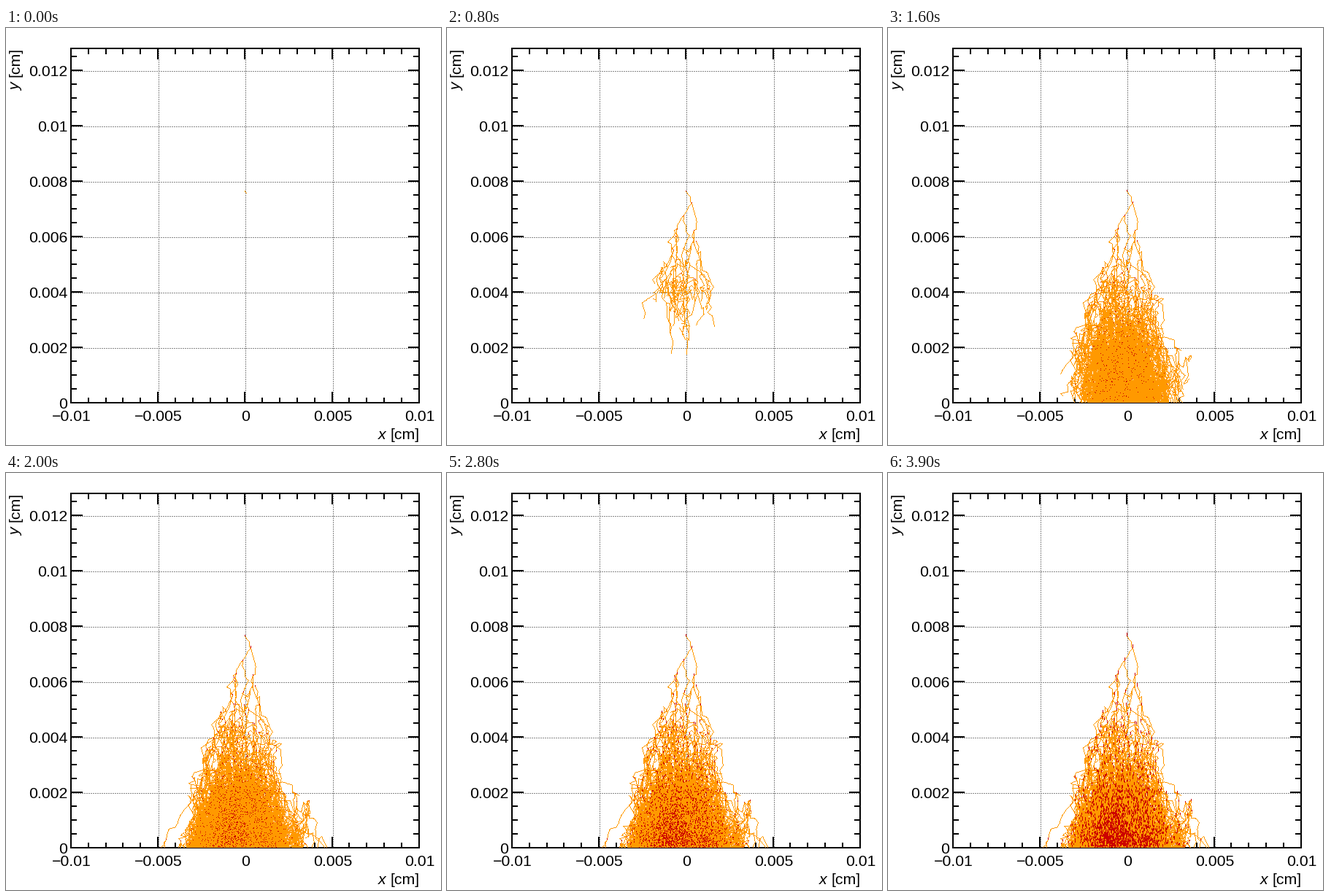
A matplotlib script that plays this animation: 596x572 px, repeating every 4000 ms.

```python
import random

import matplotlib.pyplot as plt
import numpy as np
from matplotlib.animation import FuncAnimation
from matplotlib.collections import LineCollection

W, H, DPI = 596, 572, 64
PX = 72 / DPI                      # points per pixel
LEFT, RIGHT, TOP, BOTTOM = 89, 566, 28, 514
FLOOR = BOTTOM - 1
FRAMES, INTERVAL = 40, 100
ORANGE, RED = (255, 153, 0, 255), (204, 0, 0, 255)
STEP = 0.25                        # frames between two collisions
ION_SPEED = 0.12                   # pixels per frame, upwards
ION_REACH = 6

rng = random.Random(12)
# Time at which each pixel is first touched.
electron_time = np.full((H, W), np.inf)
ion_time = np.full((H, W), np.inf)


def add_segment(t, p, q):
    """Trace one step, cut at the bottom axis; tell whether it got there."""
    (x0, y0), (x1, y1) = p, q
    hit = y1 >= FLOOR
    if hit:
        x1 = x0 + (x1 - x0) * (FLOOR - y0) / max(y1 - y0, 1e-6)
        y1 = FLOOR
    n = int(max(abs(x1 - x0), abs(y1 - y0))) + 2
    cols = np.rint(np.linspace(x0, x1, n)).astype(int)
    rows = np.rint(np.linspace(y0, y1, n)).astype(int)
    electron_time[rows, cols] = np.minimum(electron_time[rows, cols], t)
    return hit


def add_ion(t, p):
    """Let an ion creep upwards from p, one pixel at a time."""
    col, row, phase = round(p[0]), round(p[1]), rng.random()
    for k in range(ION_REACH):
        when = t + (k + 1 - phase) / ION_SPEED
        ion_time[row - k, col] = min(ion_time[row - k, col], when)


def free_path():
    return rng.randint(3, 10)


def avalanche(t, p):
    """Drift and diffuse one electron and all its descendants."""
    stack = [(t, p)]
    while stack:
        t, p = stack.pop()
        gap = free_path()
        while t < FRAMES:
            t += STEP
            q = p[0] + rng.gauss(0, 3.9), p[1] + rng.gauss(4.5, 5.2)
            if add_segment(t, p, q):
                break
            p = q
            gap -= 1
            if gap == 0:
                add_ion(t, p)
                stack.append((t, p))
                gap = free_path()


def guide(t0, t1, *keys, gap=6, seed_end=True):
    """Wander along key points, releasing an electron every gap steps."""
    keys = np.array(keys, float)
    dist = np.r_[0, np.cumsum(np.hypot(*np.diff(keys, axis=0).T))]
    n = max(4, round(dist[-1] / 7))
    path = []
    for s in np.linspace(0, dist[-1], n + 1):
        jitter = 1.6 if 0 < s < dist[-1] else 0
        path.append(tuple(np.interp(s, dist, k) + rng.gauss(0, jitter)
                          for k in keys.T))
    add_ion(t0, path[0])
    for i in range(1, n + 1):
        t = t0 + (t1 - t0) * i / n
        if add_segment(t, path[i - 1], path[i]):
            return
        if i % gap == 0 and t > 2.5:
            add_ion(t, path[i])
            avalanche(t, path[i])
    if seed_end:
        avalanche(t1, path[-1])


def build():
    # First generations near the top.
    guide(0, 1, (327, 223), (335, 239), seed_end=False)
    guide(1, 3.9, (335, 239), (323, 258), (312, 280), (315, 308))
    guide(1, 3.8, (335, 239), (340, 248), (342, 276), (333, 300))
    guide(1.7, 3.7, (324, 257), (328, 276), (325, 300))
    guide(2.9, 4.8, (312, 280), (301, 292), (313, 325))
    # Stragglers along both flanks.
    guide(3.6, 8.3, (341, 292), (347, 335), (363, 350), (358, 390),
          (366, 409), gap=12, seed_end=False)
    guide(8.3, 17, (366, 409), (383, 453), (399, 490), (396, 514), gap=12)
    guide(4.8, 19, (313, 325), (289, 356), (273, 372), (272, 420),
          (231, 482), (211, 514), gap=10)


def x_px(v):
    return 327.31 + v * 119.25 / 0.005


def y_px(v):
    return BOTTOM - v * 38000


def text(x, y, s, **kw):
    ax.text(x, y, s, family="Liberation Sans", size=21.2 * PX,
            color="black", **{"va": "baseline", **kw})


def lines(segs, width, color, **kw):
    ax.add_collection(LineCollection(
        segs, linewidths=width * PX, colors=color, antialiaseds=False,
        **{"capstyle": "butt", **kw}), autolim=False)


def draw_grid():
    dots = []
    for i in (-1, 0, 1):
        x = round(x_px(i * 0.005)) + 0.5
        dots.append([(x, TOP), (x, BOTTOM)])
    for i in range(1, 7):
        y = round(y_px(i * 0.002)) + 0.5
        dots.append([(LEFT, y), (RIGHT, y)])
    # Slightly under one pixel, so that a dot never spills over.
    lines(dots, 0.9, "#888888", zorder=1,
          linestyles=[(-0.05 / 0.9, (0.9 / 0.9, 2.1 / 0.9))])


def draw_axes():
    ticks = []
    for i in range(-9, 10):
        x, major = round(x_px(i * 0.001)), i % 5 == 0
        ticks.append([(x, BOTTOM), (x, BOTTOM - (15 if major else 7))])
        ticks.append([(x, TOP), (x, TOP + (15 if major else 8))])
    for i in range(1, 26):
        y, major = round(y_px(i * 0.0005)), i % 4 == 0
        ticks.append([(LEFT, y), (LEFT + (16 if major else 8), y)])
        ticks.append([(RIGHT, y), (RIGHT - (15 if major else 8), y)])
    lines(ticks, 2, "black", zorder=2)
    frame = [(LEFT, TOP), (RIGHT, TOP), (RIGHT, BOTTOM), (LEFT, BOTTOM)]
    sides = [[frame[i], frame[(i + 1) % 4]] for i in range(4)]
    lines(sides, 2, "black", capstyle="projecting", zorder=2)


def draw_labels():
    for i in range(-2, 3):
        label = f"{i * 0.005:g}".replace("-", "\u2212")
        text(x_px(i * 0.005) + 0.8, 539, label, ha="center")
    for i in range(7):
        text(84.3, y_px(i * 0.002) + 8, f"{i * 0.002:g}", ha="right")
    text(RIGHT + 1, 564, "[cm]", ha="right")
    text(520.5, 564, "x", ha="right", style="italic")
    turned = dict(ha="right", rotation=90, rotation_mode="anchor")
    text(19, TOP - 1, "[cm]", **turned)
    text(19, TOP + 47, "y", style="italic", **turned)


build()
fig = plt.figure(figsize=(W / DPI, H / DPI), dpi=DPI, facecolor="white")
ax = fig.add_axes([0, 0, 1, 1])
cloud = ax.imshow(np.zeros((H, W, 4), np.uint8), extent=(0, W, H, 0),
                  aspect="auto", interpolation="nearest", zorder=3)
ax.set_xlim(0, W)
ax.set_ylim(H, 0)
ax.axis("off")
draw_grid()
draw_axes()
draw_labels()


def update(frame):
    now = frame + 0.3
    pixels = np.zeros((H, W, 4), np.uint8)
    pixels[electron_time <= now] = ORANGE
    pixels[ion_time <= now] = RED
    cloud.set_data(pixels)
    return (cloud,)


anim = FuncAnimation(fig, update, frames=FRAMES, interval=INTERVAL,
                     repeat=True, repeat_delay=0, blit=False)
plt.show()
```
